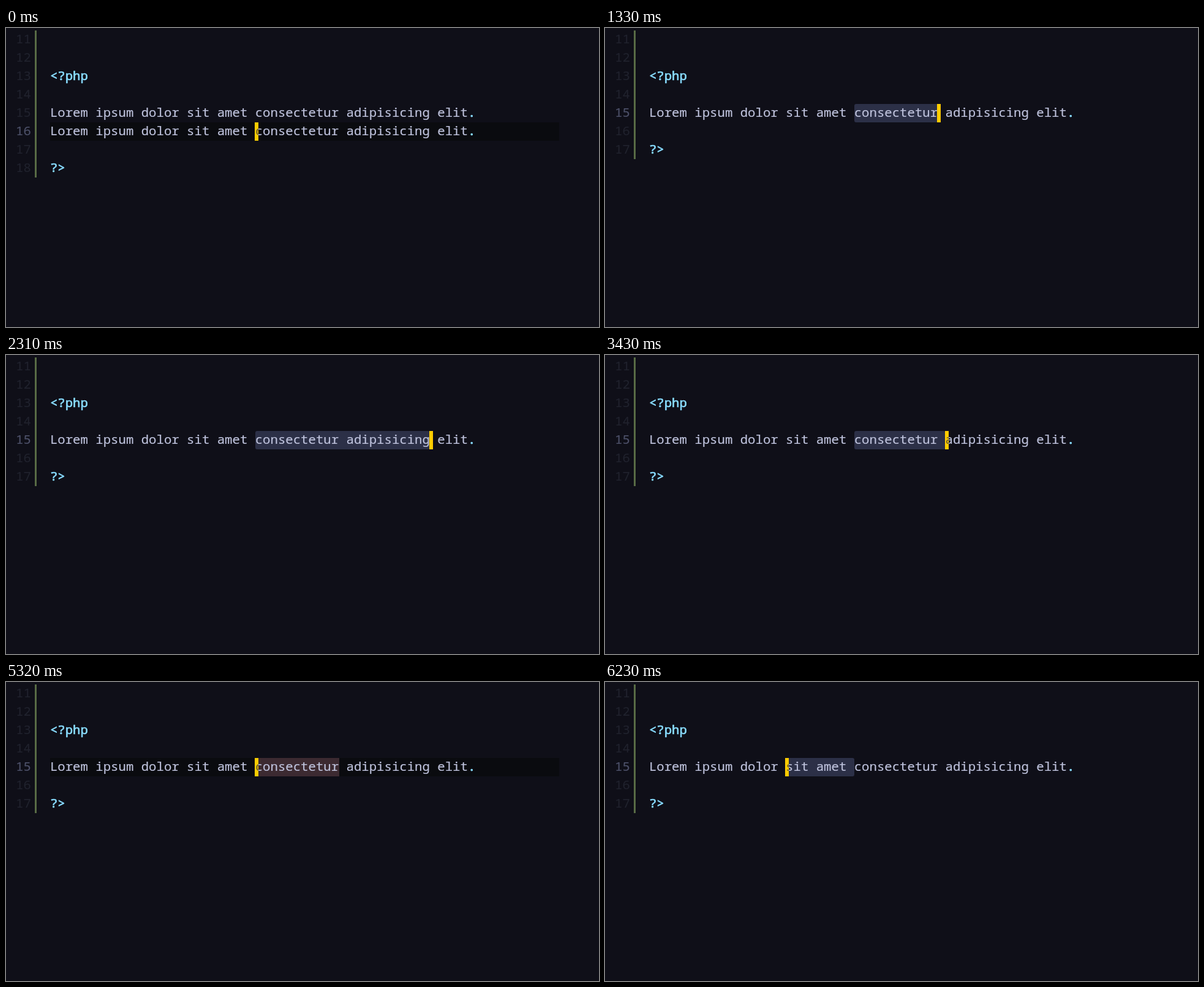
An HTML page with a canvas for the animation above (6.58 s loop, 968 by 488 pixels).

```html
<!DOCTYPE html>
<html lang="en">
<head>
<meta charset="utf-8">
<title>Editor selection</title>
<style>
  html, body { margin: 0; width: 100%; height: 100%; overflow: hidden; background: #0f0f18; }
  canvas { display: block; width: 968px; height: 488px; }
</style>
</head>
<body>
<canvas id="stage" width="968" height="488"></canvas>
<script>
const ctx = document.getElementById('stage').getContext('2d');
const LOOP = 6580;
const CELL = 12.4, ROW = 30, TOP = 4, LEFT = 72.4, FIRST = 11;
const BASELINE = 21, NUDGE = -0.5;
const FONT = '"Noto Sans Mono", "DejaVu Sans Mono", monospace';
const SENTENCE = 'Lorem ipsum dolor sit amet consectetur adipisicing elit';

const color = {
  back: '#0f0f18', line: '#0a0b0f', bar: '#586b45',
  number: '#20222d', active: '#4c5068',
  text: '#bec2dc', tag: '#89ddff',
  cursor: '#ffcc00', covered: '#6b5f2c',
  selection: '#2c3047', selectedWord: '#574a5e', word: '#3c2a31'
};

// Extra stroke width that thickens the glyphs
const REGULAR = 0.2, MEDIUM = 0.7, BOLD = 1;

// Word boundaries as columns in the sentence
const SIT = SENTENCE.indexOf('sit');
const AMET = SENTENCE.indexOf('amet');
const CON = SENTENCE.indexOf('consectetur');
const CON_END = CON + 'consectetur'.length;
const ADI = CON_END + 1;
const ADI_END = ADI + 'adipisicing'.length;

// Editor states; anchor is where a selection starts
const steps = [
  { at: 0, cursor: CON, copies: 2 },
  { at: 280, cursor: CON },
  { at: 1330, anchor: CON, cursor: CON_END },
  { at: 1610, anchor: CON, cursor: CON_END, word: true },
  { at: 2310, anchor: CON, cursor: ADI_END },
  { at: 3430, anchor: CON, cursor: ADI },
  { at: 4550, cursor: CON },
  { at: 4830, cursor: CON, word: true },
  { at: 5530, anchor: CON, cursor: AMET },
  { at: 6160, anchor: CON, cursor: SIT }
];

const colX = col => LEFT + col * CELL;
const rowY = line => TOP + (line - FIRST) * ROW;

function rect(x, y, w, h, fill) {
  ctx.fillStyle = fill;
  ctx.fillRect(x, y, w, h);
}

function type(str, x, line, fill, weight = REGULAR) {
  ctx.font = `${CELL / 0.6}px ${FONT}`;
  ctx.fillStyle = ctx.strokeStyle = fill;
  ctx.lineWidth = weight;
  ctx.lineJoin = 'round';
  const y = rowY(line) + BASELINE;
  [...str].forEach((ch, i) => {
    if (ch === ' ') return;
    const cx = x + i * CELL + NUDGE;
    ctx.fillText(ch, cx, y);
    ctx.strokeText(ch, cx, y);
  });
}

function span(from, to, line, fill, radius) {
  const a = Math.round(colX(from)), b = Math.round(colX(to));
  ctx.fillStyle = fill;
  ctx.beginPath();
  ctx.roundRect(a, rowY(line), b - a, ROW, radius);
  ctx.fill();
}

function drawCursor(col, line) {
  const x = Math.floor(colX(col) - 1), y = rowY(line);
  rect(x, y, 6, ROW, color.cursor);
  ctx.save();
  ctx.beginPath();
  ctx.rect(x, y, 6, ROW);
  ctx.clip();
  type(SENTENCE[col], colX(col), line, color.covered);
  ctx.restore();
}

function draw(state) {
  const copies = state.copies || 1;
  const current = 14 + copies;
  const last = current + 2;
  const selected = state.anchor !== undefined;

  rect(0, 0, 968, 488, color.back);
  rect(47, TOP, 3, (last - FIRST + 1) * ROW, color.bar);

  if (selected) {
    const from = Math.min(state.anchor, state.cursor);
    const to = Math.max(state.anchor, state.cursor);
    span(from, to, current, state.word ? color.selectedWord : color.selection, 3);
  } else {
    rect(72, rowY(current), 831, ROW, color.line);
    if (state.word) span(CON, CON_END, current, color.word, 0);
  }

  for (let n = FIRST; n <= last; n++) {
    type(String(n), 16.5, n, n === current ? color.active : color.number);
  }
  type('<?php', LEFT, 13, color.tag, MEDIUM);
  for (let n = 15; n <= current; n++) {
    type(SENTENCE, LEFT, n, color.text);
    type('.', colX(SENTENCE.length), n, color.tag, BOLD);
  }
  type('?>', LEFT, last, color.tag, MEDIUM);
  drawCursor(state.cursor, current);
}

const start = performance.now();

function frame(now) {
  const t = Math.max(0, now - start) % LOOP;
  draw(steps.filter(s => s.at <= t).pop());
  requestAnimationFrame(frame);
}

draw(steps[0]);
requestAnimationFrame(frame);
</script>
</body>
</html>
```
